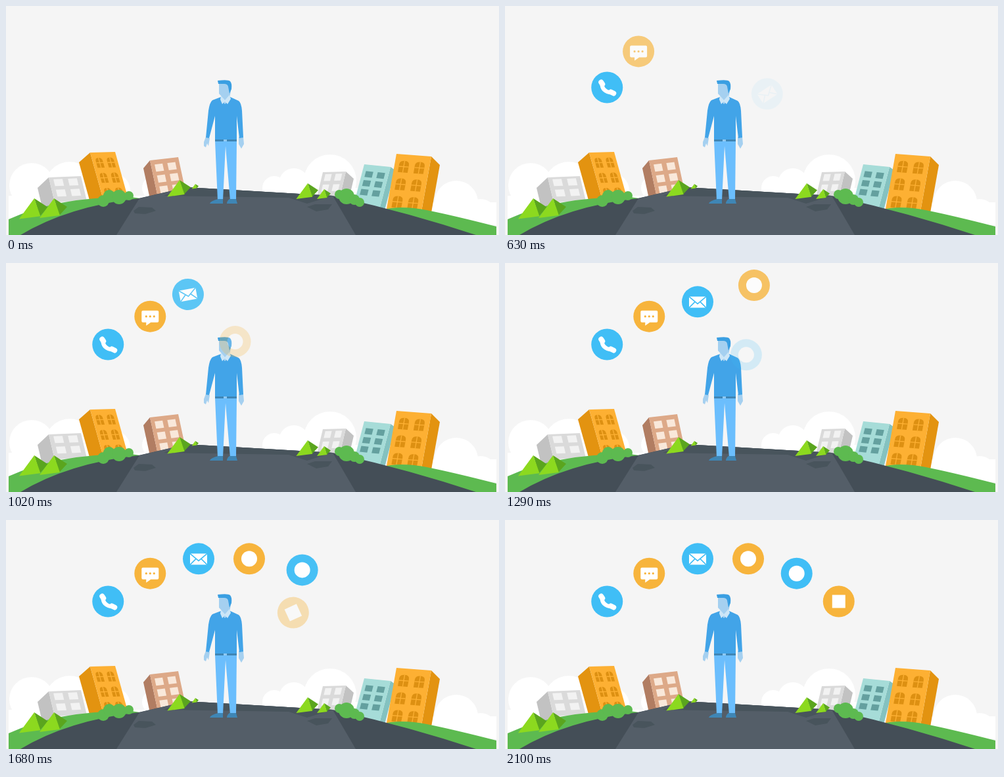
Recreate the animation shown at these times as an HTML page. Size 750x350 px, loop 2.46 s.

```html
<!DOCTYPE html>
<html lang="en">
<head>
<meta charset="utf-8">
<title>Ways to get in touch</title>
<style>
html, body { margin: 0; width: 100%; height: 100%; overflow: hidden; background: #f5f5f5; }
svg { display: block; width: 750px; height: 350px; }
</style>
</head>
<body>
<svg viewBox="0 0 750 350">
  <clipPath id="scene"><path d="M4 0H746V350H4z"/></clipPath>
  <g clip-path="url(#scene)">
    <g fill="#fff">
      <circle cx="39" cy="274" r="34"/><circle cx="97" cy="276" r="38"/><circle cx="162" cy="282" r="27"/>
      <circle cx="225" cy="278" r="18"/><path d="M4 290H235V330H4z"/>
      <circle cx="408" cy="278" r="18"/><circle cx="438" cy="271" r="23"/><circle cx="493" cy="267" r="40"/>
      <path d="M390 278H545V300H390z"/>
      <circle cx="685" cy="300" r="33"/><circle cx="722" cy="319" r="24"/><path d="M640 300H746V335H640z"/>
    </g>

    <g id="buildings"></g>

    <!-- ground and road -->
    <path fill="#5dba50" d="M4 326Q80 291 190 292L204 294 100 350H4zM570 312Q600 304 640 312T746 337V350H690z"/>
    <path fill="#444e57" d="M22 350Q95 306 202 294L275 277 497 290Q610 315 715 350z"/>
    <path fill="#545e68" d="M168 350L203 294 275 277 497 290 532 350z"/>
    <path fill="#48545c" d="M240 290L275 277 497 290 458 302 430 293zM194 313L202 307 222 308 228 313 212 318 196 317zM458 307L470 303H496L490 311 472 314z"/>

    <g id="hills"></g>
    <g fill="#5dba50">
      <circle cx="148" cy="298" r="9"/><circle cx="157" cy="290" r="9"/><circle cx="172" cy="292" r="11"/><circle cx="187" cy="290" r="7"/>
      <circle cx="507" cy="288" r="7"/><circle cx="518" cy="291" r="12"/><circle cx="530" cy="296" r="8"/><circle cx="538" cy="300" r="7"/>
    </g>
  </g>

  <!-- man -->
  <path fill="#a5d0f0" d="M324 119H342V129L340 142 333 149 327 141V137L324 134zM304 200L301 208V214L304 216 306 210 308 214 310 202zM354 200H361L362 211 358 218 354 211z"/>
  <path fill="#3a9fe2" d="M322 114Q338 112 341 115 344 118 343 127L340 134 338 123Q337 119 332 119H323z"/>
  <path fill="#42a4e8" d="M327 139L314 144Q310 147 308 160L304 201 309 202 318 168V205H351V168L355 202 361 201 359 160Q358 148 354 145L341 139 333 150z"/>
  <path fill="#cde6f7" d="M327 137L333 144 340 136 342 142 337 150 333 146 329 150 326 143z"/>
  <path fill="#6bbefd" d="M318 206H351L350 297H341L334 214 330 297H322z"/>
  <path fill="#3f86b5" d="M318 204H351V207H318zM323 295H330V302H310Q311 298 323 295zM340 295H350L352 302H336Q336 298 340 295z"/>
  <path fill="#8fc9f2" d="M331 204H336V207H331z"/>

  <!-- contact icons, each centred on 0,0 -->
  <g id="icons" fill="#fff">
    <g><circle r="24"/>
      <g fill="none" stroke="#fff" stroke-linecap="round">
        <path stroke-width="6" d="M-8-7Q-8 7 8 8"/><path stroke-width="8" d="M-9-8L-7-5M6 7L10 9"/>
      </g></g>
    <g><circle r="24"/>
      <path d="M-11-9H11q2 0 2 2V7q0 2-2 2H1L-6 14V9H-11q-2 0-2-2V-7q0-2 2-2z"/>
      <path fill="none" stroke="#f7b43c" stroke-width="3.2" stroke-linecap="round" d="M-6 0h0M0 0h0M6 0h0"/></g>
    <g><circle r="24"/>
      <path d="M-13-8H13V9H-13z"/>
      <path fill="none" stroke="#40bef6" stroke-width="1.6" d="M-13-8L0 3 13-8M-13 9L-4 0M13 9L4 0"/></g>
    <g><circle r="24"/><circle r="12"/></g>
    <g><circle r="24"/><circle r="12"/></g>
    <g><circle r="24"/><path d="M-10-10H10V10H-10z"/></g>
  </g>
</svg>
<script>
const $ = id => document.getElementById(id);

// A front face spanned by two vectors, a side face, and two columns of windows.
function building({ at: [x, y], across, down, side, rows, pitch, front, shade, pane, arched }) {
  const edge = side[0] > 0 ? across : [0, 0];
  const h = pitch * 0.33;
  const shape = arched ? `V${-h / 3}Q-.14${-h} 0${-h}T.14${-h / 3}V${h}z` : `V${-h}H.14V${h}z`;
  const bars = arched ? `<path d="M0${-h}V${h}M-.14 0H.14" stroke="${front}" stroke-width="1.3" vector-effect="non-scaling-stroke"/>` : "";
  let windows = "";
  for (let row = 0; row < rows; row++)
    for (const u of [0.27, 0.72])
      windows += `<g transform="translate(${u} ${0.22 + row * pitch})"><path d="M-.14 ${h}${shape}" fill="${pane}"/>${bars}</g>`;
  return `<path d="M${x + edge[0]} ${y + edge[1]}l${side}l${down}l${side.map(v => -v)}z" fill="${shade}"/>
    <g transform="matrix(${[...across, ...down, x, y]})"><path d="M0 0H1V1H0z" fill="${front}"/>${windows}</g>`;
}

const grey = { rows: 2, pitch: 0.42, front: "#dadada", shade: "#c2c2c2", pane: "#f2f2f2" };
const orange = { rows: 3, pitch: 0.32, front: "#fdb033", shade: "#e39310", pane: "#dd9012", arched: true };
const brown = { rows: 3, pitch: 0.3, front: "#dda988", shade: "#b17d62", pane: "#f9e8da" };
const teal = { rows: 3, pitch: 0.21, front: "#a6dcd8", shade: "#84c2c0", pane: "#64a09f" };

$("buildings").innerHTML = [
  { ...grey, at: [65, 262], across: [49, -2], down: [9, 38], side: [-17, 16] },
  { ...orange, at: [128, 224], across: [38, -1], down: [20, 72], side: [-17, 15] },
  { ...brown, at: [219, 236], across: [43, -5], down: [12, 56], side: [-10, 12] },
  { ...grey, at: [482, 254], across: [35, -1], down: [-9, 38], side: [12, 11] },
  { ...teal, at: [545, 242], across: [40, 4], down: [-17, 65], side: [7, 5] },
  { ...orange, at: [594, 226], across: [53, 4], down: [-15, 84], side: [13, 13] }
].map(building).join("");

// A peak with a lit left slope and a shaded right one.
const hill = ([x, y, s]) =>
  `<path fill="#5aa51e" d="M${x} ${y}l${s} ${s * 0.65} ${-s * 0.6} ${s * 0.65}z"/>
   <path fill="#8cd91f" d="M${x} ${y}l${-s * 1.1} ${s * 1.5} ${s * 1.55} ${-s * 0.2}z"/>`;
$("hills").innerHTML = [[43, 294, 21], [73, 294, 20], [288, 272, 5], [264, 266, 17], [484, 280, 10], [459, 271, 16]]
  .map(hill).join("");

// Icons fly out from the man, overshoot their place on an arc and settle back.
const LOOP = 2460, STEP = 30, STAGGER = 300, FLIGHT = 600;
const PEAK = 0.6, OVERSHOOT = 35, TILT = 35;
const ARC = { x: 331.5, y: 319, r: 262.5, gap: 16.87 * Math.PI / 180 };
const CHEST = [332, 167], BESIDE = [411, 143];

const icons = [...$("icons").children].map((node, i) => {
  node.firstElementChild.setAttribute("fill", i % 2 ? "#f7b43c" : "#40bef6");
  const angle = (i - 2.5) * ARC.gap;
  const start = i === 2 ? BESIDE : CHEST;
  const dx = ARC.x + ARC.r * Math.sin(angle) - start[0];
  const dy = ARC.y - ARC.r * Math.cos(angle) - start[1];
  return { node, start, dx, dy, over: 1 + OVERSHOOT / Math.hypot(dx, dy) };
});

// Share of the way from start to rest, beyond 1 while overshooting.
function travel(u, over) {
  if (u < PEAK) return over * u / PEAK;
  return 1 + (over - 1) * ((1 - u) / (1 - PEAK)) ** 2;
}

function draw(now) {
  const t = Math.floor(now % LOOP / STEP) * STEP;
  icons.forEach(({ node, start, dx, dy, over }, i) => {
    const u = Math.min(1, Math.max(0, (t - i * STAGGER) / FLIGHT));
    const way = travel(u, over);
    const turn = i % 3 === 2 ? TILT * (u - 1) : 0;
    node.setAttribute("transform", `translate(${start[0] + dx * way} ${start[1] + dy * way}) rotate(${turn})`);
    node.setAttribute("opacity", Math.min(1, u * 1.2));
  });
}

const begin = performance.now();
function tick() {
  draw(performance.now() - begin);
  requestAnimationFrame(tick);
}
tick();
</script>
</body>
</html>
```
